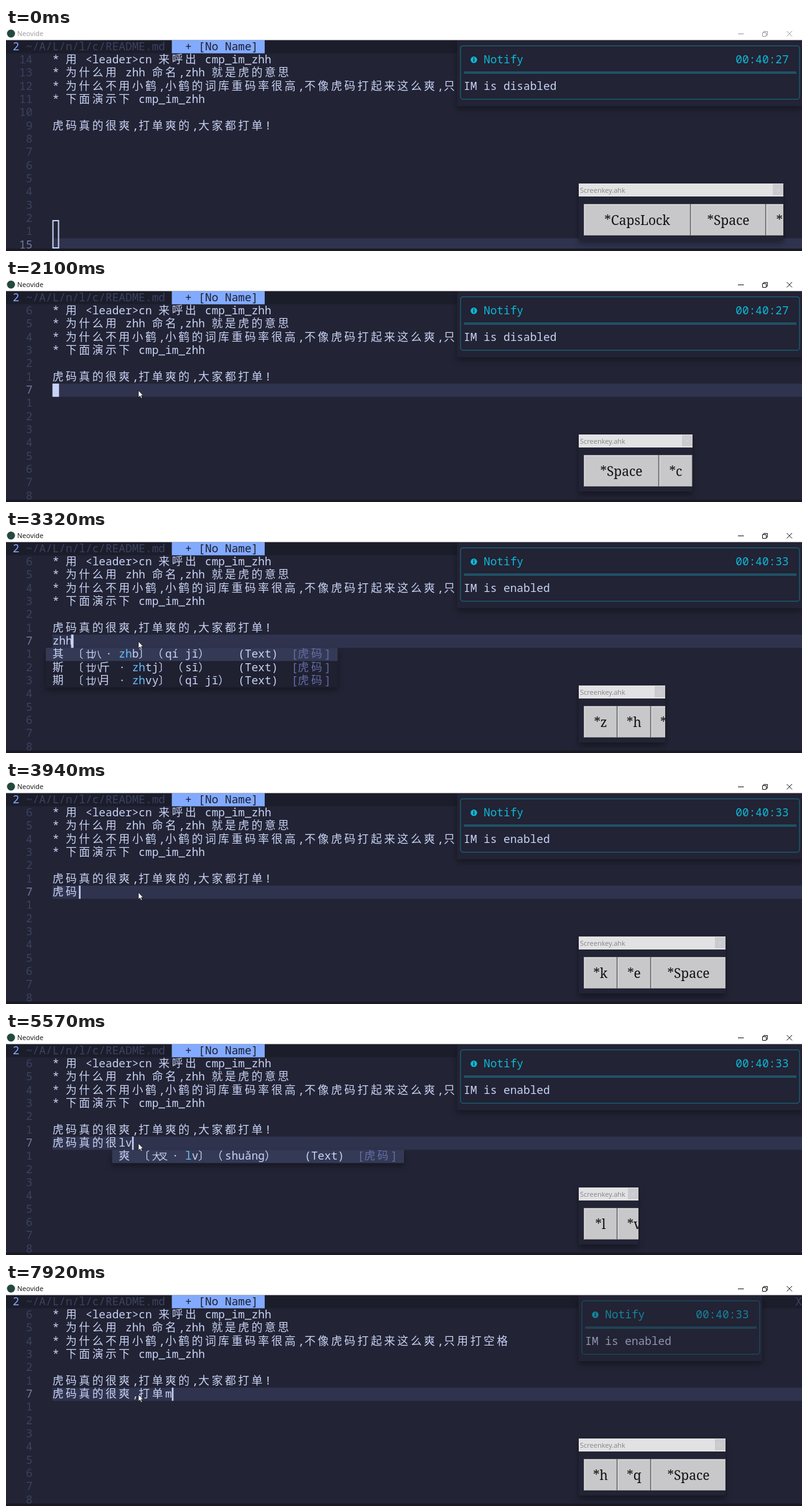
These frames come from a looping animation (1280 by 360 pixels, 8000 ms). An HTML page:

```html
<!DOCTYPE html>
<html lang="zh-CN">
<head>
<meta charset="utf-8">
<title>Editor input demo</title>
<style>
  html, body { margin: 0; width: 100%; height: 100%; overflow: hidden; background: #222334; }
  svg { display: block; }
  text { white-space: pre; }
  .mono { font: 17.78px "Noto Sans Mono", "Noto Sans CJK SC", monospace; }
  .ui { font: 11px "Open Sans", "Noto Sans", sans-serif; }
  .key { font: 21px "Noto Serif", serif; }
  .shadow { filter: drop-shadow(0 5px 5px #0005); }
</style>
</head>
<body>
<svg id="stage" width="1280" height="360" viewBox="0 0 1280 360"></svg>
<script>
const LOOP = 8000, CW = 32 / 3, CH = 64 / 3, TOP = 19.5, LEFT = 7;
const BG = '#222334', FG = '#c8d3f5', DIM = '#3b4261', BLUE = '#82aaff', TEAL = '#0db9d7';

const stage = document.getElementById('stage');
const layers = {};
for (const name of ['lines', 'menu', 'cursor', 'notes', 'strip', 'keys', 'title', 'mouse']) {
  const node = document.createElementNS('http://www.w3.org/2000/svg', 'g');
  stage.append(node);
  layers[name] = { node, html: '' };
}
function set(name, html) {
  const layer = layers[name];
  if (layer.html !== html) layer.node.innerHTML = layer.html = html;
}

const clamp = v => Math.max(0, Math.min(1, v));
const easeOut = p => 1 - (1 - clamp(p)) ** 3;
const esc = s => s.replace(/&/g, '&amp;').replace(/</g, '&lt;');
const span = ch => ch >= '\u2e80' ? 2 : 1;
const cols = s => [...s].reduce((n, ch) => n + span(ch), 0);
const at = (table, t) => table.findLast(step => step[0] <= t);
const rowY = row => TOP + row * CH;

const rect = (x, y, w, h, fill, extra = '') =>
  `<rect x="${x}" y="${y}" width="${w}" height="${h}" fill="${fill}" ${extra}/>`;

// Text on the cell grid; wide characters take two cells.
function put(col, row, str, fill = FG, extra = '') {
  let c = col;
  const xs = [...str].map(ch => {
    const x = (c * CW).toFixed(2);
    c += span(ch);
    return x;
  });
  return `<text class="mono" xml:space="preserve" x="${xs.join(' ')}" y="${(rowY(row) + 16).toFixed(1)}" fill="${fill}" ${extra}>${esc(str)}</text>`;
}

const NOTES = [
  '* 用 <leader>cn 来呼出 cmp_im_zhh',
  '* 为什么用 zhh 命名,zhh 就是虎的意思',
  '* 为什么不用小鹤,小鹤的词库重码率很高,不像虎码打起来这么爽,只用打空格',
  '* 下面演示下 cmp_im_zhh',
  '',
  '虎码真的很爽,打单爽的,大家都打单!'
];

const TYPED = [
  [0, ''], [2900, 'z'], [3080, 'zh'], [3270, 'zhh'], [3410, '虎'],
  [3510, '虎k'], [3660, '虎ke'], [3850, '虎码'], [3980, '虎码d'], [4130, '虎码dv'], [4260, '虎码真'],
  [4360, '虎码真d'], [4500, '虎码真的'], [4650, '虎码真的w'], [4840, '虎码真的很'],
  [5110, '虎码真的很l'], [5300, '虎码真的很lv'], [5720, '虎码真的很爽'], [5860, '虎码真的很爽,'],
  [6020, '虎码真的很爽,u'], [6160, '虎码真的很爽,ua'], [6480, '虎码真的很爽,打'],
  [6700, '虎码真的很爽,打h'], [6880, '虎码真的很爽,打hq'], [7220, '虎码真的很爽,打单'],
  [7870, '虎码真的很爽,打单m']
];

const KEYS = [
  [0, 1250, 'CapsLock Space c'], [1820, 1050, 'Space'], [2000, 1104, 'Space c'], [2350, 1157, 'Space c n'],
  [2690, 973, 'i'], [2900, 973, 'z'], [3080, 1017, 'z h'], [3270, 1060, 'z h h'], [3410, 1157, 'z h h Space'],
  [3510, 973, 'k'], [3660, 1017, 'k e'], [3850, 1157, 'k e Space'],
  [3980, 973, 'd'], [4130, 1017, 'd v'], [4260, 1157, 'd v Space'],
  [4360, 1211, 'd v Space d'], [4500, 1104, 'd Space'], [4650, 973, 'w'], [4840, 1104, 'w Space'],
  [5110, 973, 'l'], [5300, 1017, 'l v'], [5720, 1157, 'l v Space'],
  [5860, 973, ','], [6020, 1017, ', u'], [6160, 1060, ', u a'], [6480, 1157, ', u a Space'],
  [6700, 973, 'h'], [6880, 1017, 'h q'], [7870, 1157, 'h q Space']
];

// start, end, column, matched prefix length, [word, parts, code, reading]
const MENUS = [
  [3130, 3400, 0, 2, [['其', '廿八', ' zhb', 'qí jī'], ['斯', '廿八斤', ' zhtj', 'sī'], ['期', '廿八月', ' zhvy', 'qī jī']]],
  [3600, 3850, 2, 1, [['码', '石马', ' ke', 'mǎ']]],
  [5360, 5720, 10, 1, [['爽', '大叉', ' lv', 'shuǎng']]],
  [6080, 6480, 13, 1, [['打', '扌丁', ' ua', 'dǎ']]]
];

// Cursor corners: top left, top right, bottom right, bottom left
const box = (x, y, w, h) => [x, y, x + w, y, x + w, y + h, x, y + h];
const block = row => box(LEFT * CW, rowY(row), CW, CH);
const bar = col => box((LEFT + col) * CW, rowY(7), 2.6, CH);
const MOVES = [
  [0, box(75.5, 311, 9, 44), 1],
  [80, box(75.5, 340, 9, 15), 160],
  [980, block(7), 370],
  [2410, [75, 169, 125, 169, 110, 190, 75, 190], 60],
  [2470, [75, 168, 94, 168, 90, 190, 75, 190], 50],
  [2570, block(7), 60],
  [2690, bar(0), 100],
  ...TYPED.slice(1).map(([t, s]) => [t, bar(cols(s)), t < 7800 ? 120 : 50]),
  [6530, [332, 163, 402, 145, 355, 173, 309, 180], 65],
  [6605, bar(15), 90]
].sort((a, b) => a[0] - b[0]);

function cursorAt(t) {
  const i = MOVES.findLastIndex(m => m[0] <= t);
  const [start, to, dur] = MOVES[i];
  const from = MOVES[Math.max(0, i - 1)][1];
  const dx = to[0] - from[0], dy = to[1] - from[1];
  return to.map((v, k) => {
    const corner = k >> 1;
    const right = corner === 1 || corner === 2, low = corner > 1;
    const leads = Math.abs(dx) > Math.abs(dy) ? right === dx > 0 : low === dy > 0;
    const p = easeOut((t - start) / (dur * (leads ? 0.7 : 1)));
    return (from[k] + (v - from[k]) * p).toFixed(1);
  });
}

function drawLines(t) {
  const current = t < 980 ? 15 : 7;
  let out = rect(0, 0, 1280, 360, BG) + rect(0, TOP, 1280, CH, '#1c1d2b')
    + put(1, 0, '2', BLUE, 'font-weight="700"') + put(3, 0, '~/A/L/n/l/c/README.md', DIM)
    + rect(25 * CW, TOP, 14 * CW, CH, BLUE) + put(27, 0, '+ [No Name]', '#1c1d2b')
    + put(119, 0, 'X', DIM)
    + rect(LEFT * CW, rowY(current), 1280, CH, '#2f334d');
  for (let row = 1; row <= 15; row++) {
    const label = String(row === current ? row : Math.abs(row - current));
    out += put(4 - label.length, row, label, row === current ? '#737aa2' : DIM);
  }
  NOTES.forEach((line, i) => { out += put(LEFT, i + 1, line); });
  return out + put(LEFT, 7, at(TYPED, t)[1]);
}

function drawMenu(t) {
  const menu = MENUS.find(m => t >= m[0] && t < m[1]);
  if (!menu) return '';
  const [, , col, hit, rows] = menu;
  const c = LEFT + col;
  let out = rect((c - 1) * CW, rowY(8), 44 * CW, rows.length * CH, '#1f2030', 'class="shadow"')
    + rect((c - 1) * CW, rowY(8), 44 * CW, CH, '#343a55');
  rows.forEach(([word, parts, code, sound], i) => {
    const row = 8 + i;
    const extra = parts.slice(2);
    const dot = c + 7 + cols(extra) + (extra ? 1 : 0);
    const dotCol = extra ? dot : c + 8;
    const codeCol = dotCol + 2, key = code.trim();
    const end = codeCol + key.length;
    out += put(c, row, word) + put(c + 3, row, '〔')
      + put(c + 5, row, parts[0], FG, 'style="font-size:15px"')
      + put(c + 6, row, parts[1], FG, 'style="font-size:15px"')
      + put(c + 7, row, extra) + put(dotCol, row, '·')
      + put(codeCol, row, key.slice(0, hit), '#65bcff') + put(codeCol + hit, row, key.slice(hit) + '〕')
      + put(end + 2, row, `（${sound}）`)
      + put(c + 28, row, '(Text)') + put(c + 36, row, '[虎码]', '#636da6');
  });
  return out;
}

function drawCursor(t) {
  const style = t < 920 ? `fill="none" stroke="${FG}" stroke-width="2"` : `fill="${FG}"`;
  return `<polygon points="${cursorAt(t).join(' ')}" ${style}/>`;
}

function note(x, y, width, alpha, time, body) {
  const w = width * CW, c = x / CW;
  let inner = `<rect x="${x + 5.6}" y="28.7" width="${w - 9.6}" height="86.3" rx="4" fill="none" stroke="#1d5a70" stroke-width="1.5"/>`
    + rect(x + 11, 70, Math.max(0, w - 20), 4, '#1f5266');
  if (width > 22) {
    inner += `<circle cx="${x + 27}" cy="51.2" r="5.2" fill="${TEAL}"/>`
      + rect(x + 26.2, 47.8, 1.7, 1.7, BG) + rect(x + 26.2, 50.3, 1.7, 4, BG)
      + put(c + 4, 1, 'Notify', TEAL) + put(c + width - 10, 1, time, TEAL);
  }
  if (width > 15) inner += put(c + 1, 3, body);
  return `<g transform="translate(0 ${y.toFixed(1)})">` + rect(x, TOP, w, 5 * CH, BG, 'class="shadow"')
    + `<g opacity="${alpha.toFixed(2)}">${inner}</g></g>`;
}

// Shrinks to the right while its left edge trails behind.
function leaving(d, time, body) {
  const k = clamp(d / 160);
  if (k === 1) return '';
  const width = 52 - 48 * k;
  return note(1280 - (width + 24 * k * (1 - k)) * CW, 0, width, 1 - 0.7 * k, time, body);
}

function drawNotes(t) {
  let out = t < 2500 ? leaving(t - 2340, '00:40:27', 'IM is disabled') : '';
  if (t < 2360) return out;
  if (t >= 7860) return leaving(t - 7840, '00:40:33', 'IM is enabled');
  const rise = t < 2580 ? 99 + 7.7 * clamp((2510 - t) / 60) : 99 * (1 - easeOut((t - 2580) / 180));
  return out + note(68 * CW, rise, 52, clamp((t - 2360) / 310), '00:40:33', 'IM is enabled');
}

function drawKeys(t) {
  const [, right, list] = at(KEYS, t);
  const w = right - 921;
  let x = 8.5, buttons = '';
  for (const key of list.split(' ')) {
    const kw = key === 'CapsLock' ? 171 : key === 'Space' ? 120 : 53;
    buttons += rect(x, 33.5, kw - 0.5, 50, '#c8c8ca', 'stroke="#a5a5aa"')
      + `<path d="M${x + 1} 83V34.5H${x + kw - 1.5}" fill="none" stroke="#dedee0"/>`
      + `<text class="key" x="${x + kw / 2}" y="67" text-anchor="middle" fill="#111">*${key}</text>`;
    x += kw + 1;
  }
  return rect(921, 251, w, 92, BG, 'class="shadow"')
    + `<svg x="921" y="251" width="${w}" height="92">${rect(0, 0, w, 21, '#e2e2e4')}`
    + rect(w - 17, 1, 17, 18, '#cbcbcf')
    + `<path d="M${w - 11} 8l5 5m0-5l-5 5" stroke="#d6d6da"/>`
    + `<text class="ui" x="2" y="14.5" fill="#858588">${w < 70 ? 'Scre...' : 'Screenkey.ahk'}</text>${buttons}</svg>`;
}

function drawTitle(t) {
  const ink = t < 920 ? '#999' : '#111';
  return rect(0, 0, 1280, TOP, '#fff') + '<circle cx="8" cy="9" r="6.5" fill="#24493f"/>'
    + `<text class="ui" x="18" y="13.3" fill="${ink}">Neovide</text>`
    + `<path d="M1177 9.5h9.5M1216.5 7.5h6v6h-6zM1218.500 7.500v-2h6v6h-2M1255.500 5l8.500 8.500m0-8.500l-8.500 8.500" fill="none" stroke="${ink}"/>`;
}

const PATH = [[80, 574, 350], [250, 470, 285], [420, 320, 215], [560, 235, 168], [730, 213, 180]];
function drawMouse(t) {
  if (t < 80) return '';
  const i = Math.min(PATH.findLastIndex(p => p[0] <= t), PATH.length - 2);
  const [t0, x0, y0] = PATH[i], [t1, x1, y1] = PATH[i + 1];
  const p = clamp((t - t0) / (t1 - t0));
  const x = x0 + (x1 - x0) * p, y = y0 + (y1 - y0) * p;
  return `<path transform="translate(${x.toFixed(1)} ${y.toFixed(1)})" d="M0 0V11L2.500 8.700 4.300 12.500 6 11.700 4.300 8H7.500Z" fill="#fff" stroke="#111" stroke-width=".7"/>`;
}

function render(t) {
  set('lines', drawLines(t));
  set('menu', drawMenu(t));
  set('cursor', drawCursor(t));
  set('notes', drawNotes(t));
  set('strip', rect(0, 356, 1280, 4, '#191a24'));
  set('keys', drawKeys(t));
  set('title', drawTitle(t));
  set('mouse', drawMouse(t));
}

const begin = performance.now();
function tick() {
  render((performance.now() - begin) % LOOP);
  requestAnimationFrame(tick);
}
tick();
</script>
</body>
</html>
```
